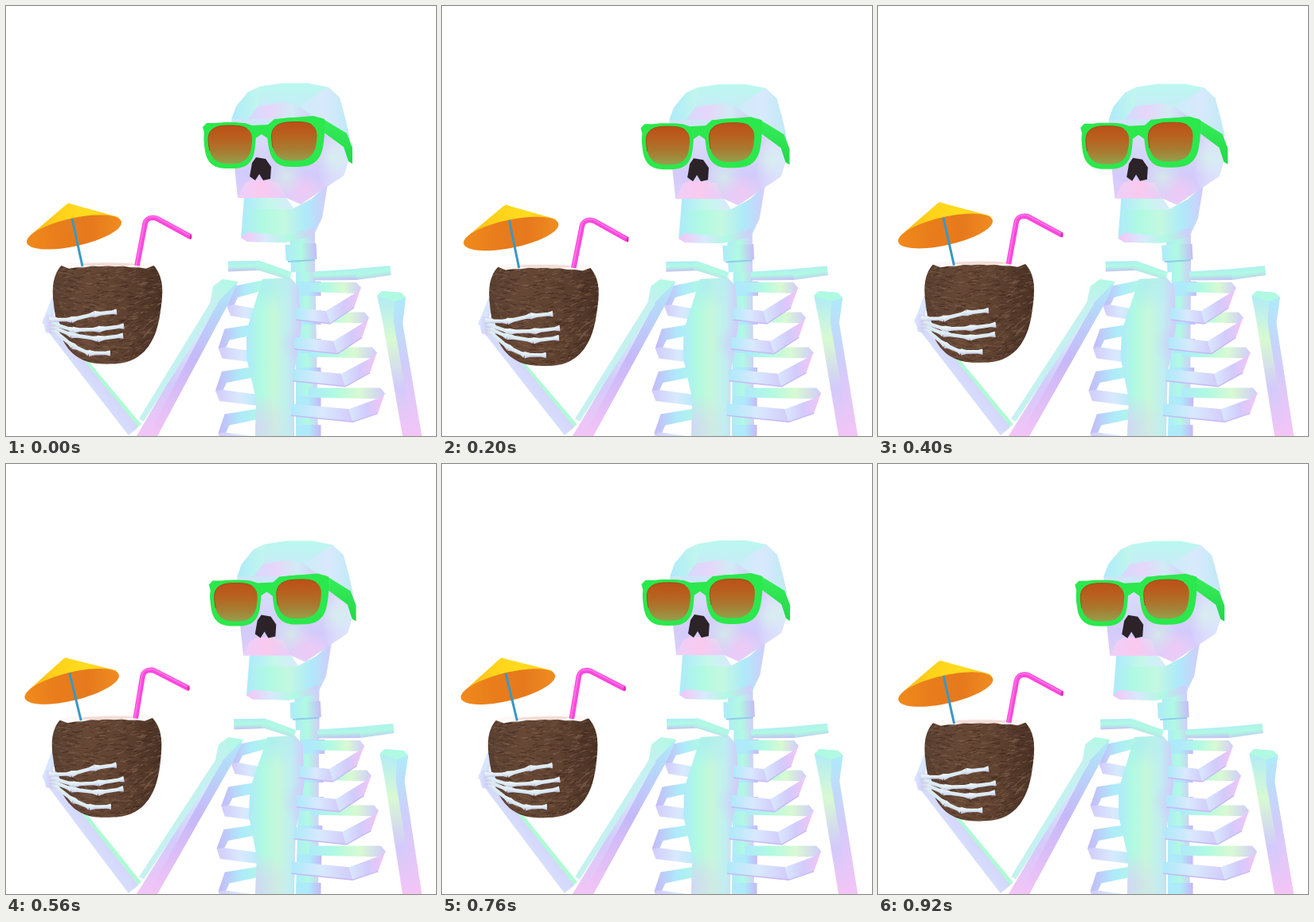
An HTML page with a canvas that plays this animation: 540 px wide and 540 px high, repeating every 960 ms.

```html
<!DOCTYPE html>
<html lang="en">
<head>
<meta charset="utf-8">
<title>Skeleton with a coconut drink</title>
<style>
html, body { margin: 0; width: 100%; height: 100%; overflow: hidden; background: #fff; }
canvas { display: block; width: 540px; height: 540px; }
</style>
</head>
<body>
<canvas id="stage" width="540" height="540"></canvas>
<script>
const ctx = document.getElementById('stage').getContext('2d');
const LOOP = 960, STEP = 40, TAU = Math.PI * 2;
const MINT = '#b0fae2', CYAN = '#aeeafa', LAV = '#d2cbfb', PINK = '#f4c4f6',
      LIME = '#d8fad2', ICE = '#d9e9fd', VIOLET = '#c6b8f8';
const DOWN = Math.PI / 2;

const clamp = v => Math.max(0, Math.min(1, v));
const wave = (t, peak) => Math.cos((t - peak) / LOOP * TAU);

let time = 0, warp;

// The torso sways from the hips; the head turns with it and nods a little.
function body(x, y) {
  const turn = (1 - wave(time, 20)) / 2 * clamp((520 - y) / 180);
  const nod = 1.2 * (wave(time, 250) + 0.07) * clamp((340 - y) / 50);
  return [x + turn * (8 - (x - 250) * 4 / 230), y + nod];
}

// The drink rocks around the wrist.
function drink(x, y) {
  const c = wave(time, 170) - 0.44, tilt = 0.019 * c;
  return [x - tilt * (y - 400), y + 3 * c + tilt * (x - 50)];
}

// The forearm follows the drink at the wrist and rests at the elbow.
function forearm(x, y) {
  const [a, b] = drink(x, y), k = clamp((530 - y) / 130);
  return [x + (a - x) * k, y + (b - y) * k];
}

const parse = p => typeof p === 'string' ? p.split(' ').map(q => q.split(',').map(Number)) : p;
const place = pts => parse(pts).map(p => warp(...p));

function trace(pts) {
  ctx.beginPath();
  pts.forEach(p => ctx.lineTo(...p));
  ctx.closePath();
}

// Fills a polygon; several colours run across its bounds at the given angle.
function shape(pts, colors, angle = 0) {
  const w = place(pts);
  trace(w);
  ctx.fillStyle = colors;
  if (Array.isArray(colors)) {
    const xs = w.map(p => p[0]), ys = w.map(p => p[1]);
    const l = Math.min(...xs), r = Math.max(...xs), t = Math.min(...ys), b = Math.max(...ys);
    const ux = Math.cos(angle), uy = Math.sin(angle);
    const h = (Math.abs(ux) * (r - l) + Math.abs(uy) * (b - t)) / 2, cx = (l + r) / 2, cy = (t + b) / 2;
    const g = ctx.createLinearGradient(cx - ux * h, cy - uy * h, cx + ux * h, cy + uy * h);
    colors.forEach((c, i) => g.addColorStop(i / (colors.length - 1), c));
    ctx.fillStyle = g;
  }
  ctx.fill();
}

// Rounded outline: n squares it off, taper narrows the bottom, tilt shears it.
function oval(cx, cy, rx, ry, n = 2, taper = 0, tilt = 0) {
  const bulge = v => Math.sign(v) * Math.abs(v) ** (2 / n);
  return Array.from({ length: 64 }, (_, i) => {
    const u = bulge(Math.cos(i / 64 * TAU)), v = bulge(Math.sin(i / 64 * TAU));
    return [cx + rx * u * (1 - taper * v), cy + ry * v + tilt * rx * u];
  });
}

// Straight bar whose shading runs across its width.
function bar(x0, y0, x1, y1, w0, w1, colors) {
  const a = Math.atan2(y1 - y0, x1 - x0) + DOWN, c = Math.cos(a) / 2, s = Math.sin(a) / 2;
  shape([[x0 - c * w0, y0 - s * w0], [x1 - c * w1, y1 - s * w1],
         [x1 + c * w1, y1 + s * w1], [x0 + c * w0, y0 + s * w0]], colors, a);
}

function glow(x, y, r, rgb) {
  const [cx, cy] = warp(x, y), g = ctx.createRadialGradient(cx, cy, 0, cx, cy, r);
  g.addColorStop(0, `rgba(${rgb},.6)`);
  g.addColorStop(1, `rgba(${rgb},0)`);
  ctx.fillStyle = g;
  ctx.fillRect(cx - r, cy - r, 2 * r, 2 * r);
}

function line(pts, color, width, radius = 0) {
  const w = place(pts);
  ctx.beginPath();
  ctx.moveTo(...w[0]);
  for (let i = 1; i < w.length - 1; i++) ctx.arcTo(...w[i], ...w[i + 1], radius);
  ctx.lineTo(...w[w.length - 1]);
  ctx.strokeStyle = color;
  ctx.lineWidth = width;
  ctx.stroke();
}

function clipped(pts, paint) {
  ctx.save();
  trace(place(pts));
  ctx.clip();
  paint();
  ctx.restore();
}

function leftRib(i) {
  const x = 263 + 3.5 * (i - 2) ** 2, y = 352 + 53.5 * i, end = 324;
  shape([[x + 8, y], [end, y - 8], [end, y + 5], [x + 14, y + 14], [x + 8, y + 27], [x, y + 24]], [VIOLET, CYAN, MINT]);
  shape([[x, y + 24], [x + 9, y + 23], [end, y + 30], [end, y + 44], [x + 5, y + 37]], [LAV, ICE, CYAN]);
}

// Each right rib leaves the spine, folds at its tip and returns to the chest.
function rightRib(i) {
  const tip = 446 + 10 * i, y = 347 + 34 * i + 3.4 * i * i;
  const kx = 402 + 9.5 * i, ky = 383 + 36 * i + 1.7 * i * i, sx = 364 - 2 * i, sy = ky - 4 - i;
  return {
    back() {
      shape([[380, y], [tip - 6, y], [tip, y + 7], [tip - 4, y + 14], [380, y + 12]], [CYAN, MINT, LIME, LAV]);
    },
    front() {
      shape([[tip - 5, y + 12], [tip, y + 6], [tip - 9, y + 32], [kx + 5, ky + 16], [kx, ky]], [ICE, LAV, PINK]);
      shape([[sx, sy], [kx, ky], [kx + 5, ky + 16], [sx, sy + 15]], [CYAN, ICE, LAV]);
      line([[sx, sy + 15], [kx + 5, ky + 16], [tip - 9, y + 32]], VIOLET, 1.4);
    }
  };
}

function torso() {
  warp = body;
  const rows = [0, 1, 2, 3], ribs = rows.map(rightRib);
  bar(376, 318, 378, 540, 24, 28, [LAV, MINT, CYAN]);
  for (let y = 346; y < 540; y += 36) bar(380, y, 380, y + 18, 31, 31, [VIOLET, CYAN, CYAN]);
  ribs.forEach(r => r.back());
  rows.forEach(leftRib);

  const chest = '322,343 357,341 367,352 371,400 362,462 362,540 313,540 314,494 302,442 302,408 312,376';
  shape(chest, [CYAN, MINT, '#c6f8da', '#c0eff0', LAV]);
  clipped(chest, () => {
    glow(314, 530, 45, '235,195,250');
    glow(330, 350, 34, '165,232,250');
    glow(368, 425, 26, '210,200,252');
  });
  ribs.forEach(r => r.front());

  bar(279, 327, 318, 326, 13, 12, [CYAN, MINT, VIOLET]);
  bar(315, 325, 357, 339, 12, 10, [CYAN, MINT, VIOLET]);
  bar(386, 339, 441, 337, 11, 14, [CYAN, MINT, VIOLET]);
  bar(440, 337, 483, 332, 14, 12, [CYAN, MINT, VIOLET]);
}

function arms() {
  warp = body;
  shape('466,364 472,358 496,360 502,366 498,398 522,540 498,540 473,397', [CYAN, LIME, LAV, PINK], DOWN);
  shape('488,366 502,366 498,398 522,540 512,540 487,398', [CYAN, LAV, PINK], DOWN);
  shape('466,364 472,358 496,360 502,366 488,371', MINT);

  shape('260,352 272,343 291,346 279,374 190,540 164,540 254,386', [MINT, ICE, LAV, PINK], 2);
  shape('291,346 279,374 190,540 178,540 266,372', [CYAN, VIOLET, PINK], 2);
  bar(262, 372, 170, 520, 9, 7, [MINT, ICE]);
}

function neck() {
  warp = body;
  bar(372, 284, 373, 334, 32, 30, [LAV, MINT, CYAN]);
  bar(370, 299, 371, 319, 39, 39, [VIOLET, MINT, CYAN]);
  line('354,321 388,319', '#8fcde8', 2);
}

function head() {
  warp = body;
  shape('299,241 352,241 361,254 384,242 404,224 397,266 386,289 350,297 303,296 295,291', [CYAN, MINT, '#c4f8e0', CYAN, LAV]);
  shape('295,291 303,284 350,288 387,278 386,289 350,297 303,296', [PINK, ICE, MINT, LAV]);
  shape('299,241 352,241 361,255 299,255', [CYAN, '#c4f8ea', ICE]);

  const skull = '283,142 289,126 304,108 319,101 346,97 380,97 405,102 419,115 426,140 431,162 430,194 424,213 400,229 370,249 352,241 291,241 287,203';
  shape(skull, ['#bbf8ef', '#cbe9f8', '#d8d9fb', LAV, '#e4cff9'], DOWN);
  clipped(skull, () => {
    shape('283,142 289,126 304,108 319,101 316,126 304,142', [CYAN, '#c2f7ec']);
    shape('304,142 316,126 348,121 368,126 388,141', ['#d4dbfc', '#e6d6fa', '#d2ebf5', LAV]);
    shape('368,126 405,102 419,115 431,164 400,146', ['#ccecf8', ICE, '#bfeaf4']);
    shape('398,160 431,164 430,194 424,213 400,229 390,205', [LAV, '#dcdcfc', ICE]);
    shape('300,222 313,217 342,221 352,241 291,241', ['#ecd0f9', '#fac9ef', '#e6cffa']);
    glow(352, 214, 24, '215,248,224');
    glow(374, 232, 24, '250,200,242');
    glow(410, 190, 24, '212,250,230');
  });
  shape('314,190 326,192 333,202 332,217 323,219 318,211 313,219 306,214 309,197', '#2b2328');
}

function glasses() {
  const green = '#2be84c', tint = ['#bb5018', '#b8611e', '#a97a30', '#94a04c'];
  warp = body;
  shape('395,140 405,146 428,160 435,178 435,198 430,195 424,177 398,158', ['#38ee5a', '#22d848'], DOWN);
  shape(oval(281, 175, 32, 29, 3, .1), green);
  shape(oval(364, 171, 35, 31, 3, .12, -.02), green);
  shape('247,152 252,147 300,147 309,150 329,149 337,142 386,138 400,142 400,158 331,168 321,161 312,167 250,163', green);
  const lenses = [oval(281.5, 174, 27, 24, 2.8, .1), oval(362, 170, 28, 24.5, 2.8, .1, -.02)];
  lenses.forEach(l => {
    shape(l, tint, DOWN);
    line(l.slice(30, 56), '#a34a16', 1);
  });
}

function lowerArm() {
  warp = forearm;
  bar(88, 436, 164, 530, 11, 15, [VIOLET, '#b4fbd9', '#a8f8cc', LAV]);
  bar(55, 402, 160, 534, 12, 16, [PINK, LAV, ICE, '#aef8d0']);
}

function coconut() {
  const nut = oval(127.5, 379.5, 67, 70, 2.7, .14).map(([x, y]) => [x, Math.max(y, 325)]);
  shape(nut, ['#594031', '#674836', '#5e4130', '#4a3225']);
  clipped(nut, () => {
    let seed = 7;
    const rnd = () => (seed = seed * 16807 % 2147483647) / 2147483647;
    const tones = ['#3b261b', '#7c5d48', '#4a3023', '#84654d'];
    ctx.globalAlpha = .6;
    for (let i = 0; i < 800; i++) {
      const x = 56 + rnd() * 140, y = 326 + rnd() * 126, len = 3 + rnd() * 6;
      const slope = (127 - x) / 68 * (y - 325) / 130 - .1 + (rnd() - .5) * .7;
      line([[x, y], [x + len, y + slope * len]], tones[i % 4], 1.1);
    }
    ctx.globalAlpha = 1;
  });
  // Chipped white edge of the opening.
  const chips = Array.from({ length: 13 }, (_, i) => {
    const u = i / 6 - 1;
    return [127.5 - u * 58, 326 + 5 * u ** 2 * (1 - u ** 8) + (i % 2)];
  });
  shape([[69, 325], [80, 322], [126, 321], [176, 322], [187, 324], ...chips], '#fdf8f6');
  shape(oval(128, 324.5, 34, 2), '#f3dcd6');
}

function umbrella() {
  shape('26,296 34,285 76,249 79,247.5 83,249 141,265 145,271', ['#fbb41c', '#ffd21a', '#ffdc1e', '#f9c41e']);
  shape(oval(85.5, 284, 59.5, 18, 2, 0, -.2), ['#f08a1c', '#e97d1b', '#e6791d', '#f08c20']);
  line('83,267 96,327', '#3a98c4', 3);
}

function straw() {
  line('164.5,326 176,266 188,266 232,290', '#fb48dc', 6.6, 9);
  line('163.4,326 175,265 188,264.5 232,288.6', '#ff70e6', 2, 9);
  shape(oval(231.8, 290, 1.6, 3), '#d92fb8');
}

// A finger bone is a narrow shaft with a wider joint at each end.
function bone([x0, y0], [x1, y1]) {
  const colors = ['#f3fbfb', '#dcebf3', '#c3bfe2'];
  const at = k => [x0 + (x1 - x0) * k, y0 + (y1 - y0) * k];
  bar(x0, y0, x1, y1, 5, 4.4, colors);
  bar(...at(0), ...at(.25), 8.4, 5, colors);
  bar(...at(.8), ...at(1), 4.5, 7.6, colors);
}

function hand() {
  shape('46,394 52,388 64,391 68,400 62,412 50,410', [ICE, LAV, ICE]);
  ['58,406 84,427 104,436 131,436', '56,402 82,413 115,418 147,414',
   '56,398 84,407 116,406 148,402', '54,394 82,394 111,387 139,384'].forEach(f => {
    const p = parse(f);
    p.slice(1).forEach((q, i) => bone(p[i], q));
  });
}

function draw() {
  ctx.clearRect(0, 0, 540, 540);
  ctx.lineCap = 'butt';
  ctx.lineJoin = 'round';
  torso();
  arms();
  neck();
  head();
  glasses();
  lowerArm();
  warp = drink;
  bar(61, 366, 51, 400, 6, 12, [LAV, ICE, LAV]);
  coconut();
  straw();
  umbrella();
  hand();
}

let last = -1;
function tick() {
  const step = Math.floor(performance.now() % LOOP / STEP);
  if (step !== last) {
    last = step;
    time = step * STEP;
    draw();
  }
  requestAnimationFrame(tick);
}
tick();
</script>
</body>
</html>
```
